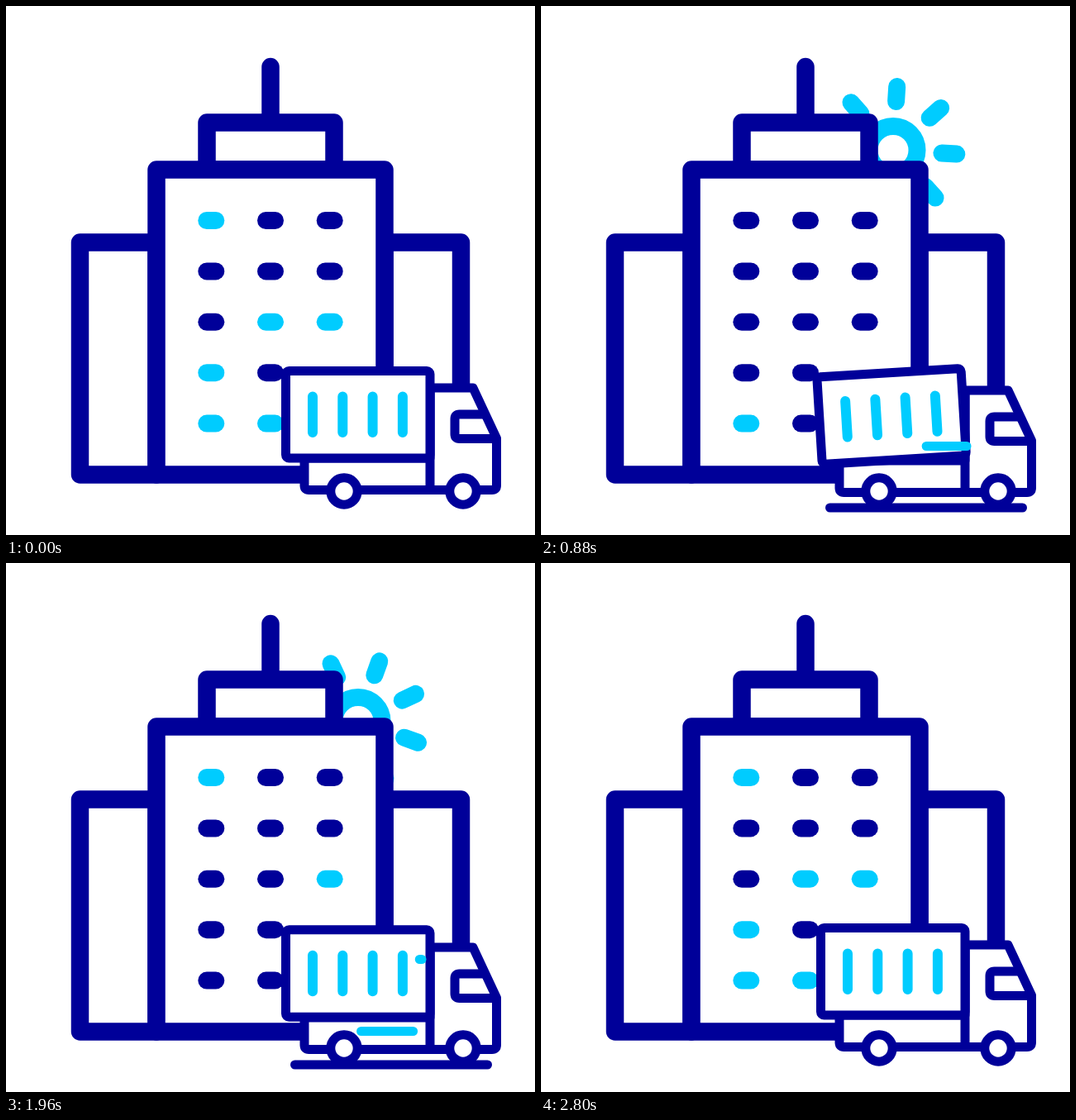
Write an HTML page with a canvas that moves like this. It is 640x640 px and loops after 3000 ms.

```html
<!DOCTYPE html>
<html lang="en">
<head>
<meta charset="utf-8">
<title>Delivery truck</title>
<style>
html, body { margin: 0; width: 100%; height: 100%; overflow: hidden; background: #fff; }
canvas { display: block; width: 100vw; height: 100vh; }
</style>
</head>
<body>
<canvas id="stage" width="640" height="640"></canvas>
<script>
const ctx = document.getElementById('stage').getContext('2d');
const NAVY = '#000099', CYAN = '#00ccff', WHITE = '#ffffff';
const LOOP = 3000, STEP = 40, LAST = 2800;
const WALL = 21.5, TRIM = 11;

const clamp = v => Math.max(0, Math.min(1, v));
const span = (t, a, b) => clamp((t - a) / (b - a));
const mix = (a, b, p) => a + (b - a) * p;
const rad = deg => deg * Math.PI / 180;
const wave = (t, peak, period) => Math.cos(2 * Math.PI * (t - peak) / period);

function stroke(path, color, width, fill) {
  if (fill) { ctx.fillStyle = fill; ctx.fill(path); }
  ctx.strokeStyle = color;
  ctx.lineWidth = width;
  ctx.stroke(path);
}

function line(x1, y1, x2, y2, color, width) {
  stroke(new Path2D(`M${x1} ${y1}L${x2 + 0.01} ${y2}`), color, width);
}

function box(x1, y1, x2, y2, width, radius = 0) {
  const path = new Path2D();
  path.roundRect(x1, y1, x2 - x1, y2 - y1, radius);
  stroke(path, NAVY, width, WHITE);
}

function ring(x, y, r, color, width) {
  const path = new Path2D();
  path.arc(x, y, r, 0, Math.PI * 2);
  stroke(path, color, width, WHITE);
}

// Windows, counted row by row, in the order they go dark and light up again
const darkOrder = [0, 8, 7, 9, 13, 12];
const lightOrder = [0, 8, 9, 13, 12, 7];

function isLit(cell, t) {
  const turn = darkOrder.indexOf(cell);
  return turn >= 0 && (t < 420 + 115 * turn || t >= 1780 + 150 * lightOrder.indexOf(cell));
}

function drawWindows(t) {
  for (let cell = 0; cell < 14; cell++) {
    const row = Math.floor(cell / 3), col = cell % 3;
    if (row === 3 && col === 2) continue;
    const x = 248.3 + col * 71.7, y = 259.5 + row * 61.4;
    line(x - 5.5, y, x + 5.5, y, isLit(cell, t) ? CYAN : NAVY, 21);
  }
}

function drawBuilding(t) {
  box(89.5, 286, 182, 567, WALL);
  box(458, 286, 550.5, 567, WALL);
  line(320, 73.5, 320, 141, NAVY, WALL);
  box(243, 141, 397, 198, WALL);
  box(182, 198, 458, 567, WALL);
  drawWindows(t);
}

function drawSun(t) {
  if (t < 400 || t >= 2280) return;
  const rise = (1 - span(t, 390, 1060)) ** 3;
  const set = span(t, 1680, 2280) ** 2;
  ctx.save();
  ctx.translate(426, 174 + 150 * rise ** 1.5 + 80 * set);
  ring(0, 0, 29, CYAN, 21);
  ctx.rotate(rad(180 * rise + 90 * set));
  for (let k = 0; k < 8; k++) {
    const start = k ? 592 + 5 * k : 540;
    const age = Math.min(t - start, (2250 - t) * 0.8);
    if (age <= 0) continue;
    ctx.save();
    ctx.rotate(rad(90 - 45 * k));
    line(0, -59, 0, -59 - 18 * span(age, 40, 120), CYAN, 21 * clamp(age / 40));
    ctx.restore();
  }
  ctx.restore();
}

function pose(px, py, shift, tilt) {
  ctx.translate(px, py + shift);
  ctx.rotate(rad(tilt));
  ctx.translate(-px, -py);
}

const bodyPath = new Path2D('M513 462H565L593.5 523V580Q593.5 585.5 588 585.5H366.5Q361 585.5 361 580V547H513Z');
const cabPath = new Path2D('M513 462V585.5M577 494H548.5Q543 494 543 499.5V518Q543 523.5 548.5 523.5H593');

function drawTruck(t) {
  const drive = span(t, 80, 900) * (1 - span(t, 2100, 2700));
  const bounce = wave(t, 880, 1080);
  const kick = Math.max(0, wave(t, 940, 640)) ** 2;

  ctx.save();
  pose(478, 585, drive * (1 + 2 * bounce), drive * 0.6 * (bounce - 1));
  stroke(bodyPath, NAVY, TRIM, WHITE);
  stroke(cabPath, NAVY, TRIM);
  ctx.restore();

  ctx.save();
  pose(425, 521, drive * 2.2, drive * -5.2 * kick);
  box(338.5, 441.5, 513, 547, TRIM, 4);
  for (let i = 0; i < 4; i++) {
    const x = 371 + i * 36.3;
    line(x, 472.5, x, 516, CYAN, 12);
  }
  ctx.restore();

  ring(409, 587, 16.2, NAVY, TRIM);
  ring(553, 587, 16.2, NAVY, TRIM);
}

function drawRoad(t) {
  const grow = 1 - (1 - span(t, 400, 760)) ** 3;
  const leave = span(t, 2000, 2400) ** 3;
  if (grow > 0 && leave < 1) {
    line(mix(582.5, 349.5, grow), 607, mix(582.5, 349.5, leave), 607, NAVY, TRIM);
  }
}

function drawGust(t, y, right, start, pace = 1) {
  const age = (t - start) / pace;
  if (age < 0 || age > 555) return;
  const left = right - 137;
  line(mix(right, left, span(age, 0, 300)), y, mix(right, left, span(age, 115, 555)), y, CYAN, TRIM);
}

function draw(t) {
  ctx.fillStyle = WHITE;
  ctx.fillRect(0, 0, 640, 640);
  ctx.lineCap = ctx.lineJoin = 'round';
  drawSun(t);
  drawBuilding(t);
  drawRoad(t);
  drawTruck(t);
  drawGust(t, 532.5, 515, 773);
  drawGust(t, 566.5, 515, 1773);
  drawGust(t, 479.5, 503, 1955, 0.85);
}

function tick(now) {
  const t = now % LOOP;
  draw(Math.min(LAST, Math.floor(t / STEP) * STEP));
  requestAnimationFrame(tick);
}
draw(0);
requestAnimationFrame(tick);
</script>
</body>
</html>
```
